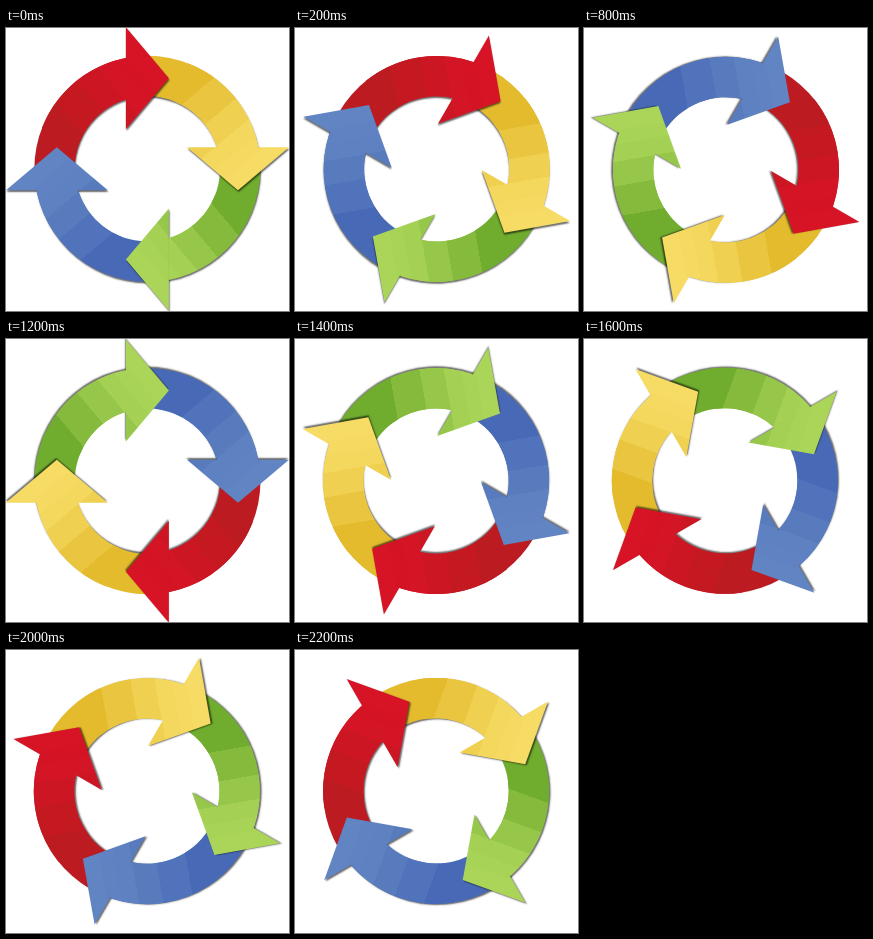
An HTML page with a canvas for the animation above (2.4 s loop, 283 by 283 pixels).

```html
<!DOCTYPE html>
<html lang="en">
<head>
<meta charset="utf-8">
<title>Cycle of four arrows</title>
<style>
  html, body { margin: 0; width: 100%; height: 100%; overflow: hidden; background: #fff; }
  canvas { display: block; width: 283px; height: 283px; }
</style>
</head>
<body>
<canvas id="stage"></canvas>
<script>
const SIZE = 283, STEP_MS = 200, STEPS = 12;
const OUTER = 113, INNER = 72.7;
const HEAD = { y: -90.6, tip: 21.5, half: 51 };
const SHADOW = { x: 0.7, y: 1.7, blur: 1.6, color: 'rgba(0,0,0,.58)' };

// Colour bands along the gradient axis: where each ends and how light it is.
const FROM = -90, TO = 80, TILT = -40 * Math.PI / 180;
const BANDS = [[-27, 0], [3, 0.35], [27, 0.65], [44, 0.88], [58, 0.94], [TO, 1]];

// Tail and tip colours, clockwise from the upper left.
const COLORS = [
  [[188, 27, 33], [214, 20, 37]],
  [[227, 187, 45], [246, 219, 100]],
  [[112, 172, 46], [171, 213, 89]],
  [[72, 106, 182], [97, 132, 195]]
];

const canvas = document.getElementById('stage');
const ctx = canvas.getContext('2d');
const ratio = window.devicePixelRatio || 1;
canvas.width = canvas.height = SIZE * ratio;

function bandedFill([tail, tip]) {
  const c = Math.cos(TILT), s = Math.sin(TILT);
  const g = ctx.createLinearGradient(FROM * c, FROM * s, TO * c, TO * s);
  let from = FROM;
  for (const [to, k] of BANDS) {
    const color = `rgb(${tail.map((v, j) => Math.round(v + (tip[j] - v) * k))})`;
    g.addColorStop((from - FROM) / (TO - FROM), color);
    g.addColorStop((to - FROM) / (TO - FROM), color);
    from = to;
  }
  return g;
}

const fills = COLORS.map(bandedFill);

function arc(from, to) {
  const a = from * Math.PI / 180, b = to * Math.PI / 180;
  ctx.beginPath();
  ctx.arc(0, 0, OUTER, a, b);
  ctx.arc(0, 0, INNER, b, a, true);
  ctx.closePath();
  ctx.fill();
}

function head() {
  ctx.beginPath();
  ctx.moveTo(-HEAD.tip, HEAD.y - HEAD.half);
  ctx.lineTo(HEAD.tip, HEAD.y);
  ctx.lineTo(-HEAD.tip, HEAD.y + HEAD.half);
  ctx.closePath();
  ctx.fill();
}

// Body beside the head, kept free of the head's own shadow.
function cleanBody() {
  ctx.beginPath();
  ctx.rect(-150, -150, 150 - HEAD.tip + 0.5, 150);
  ctx.clip();
  arc(201, 270);
}

function eachArrow(paint) {
  fills.forEach((fill, i) => {
    ctx.save();
    ctx.rotate(i * Math.PI / 2);
    ctx.fillStyle = fill;
    paint();
    ctx.restore();
  });
}

// Canvas shadows ignore the transform, so the offset is turned here.
function setShadow(on, turn) {
  const c = Math.cos(turn), s = Math.sin(turn);
  ctx.shadowColor = on ? SHADOW.color : 'transparent';
  ctx.shadowBlur = SHADOW.blur * ratio;
  ctx.shadowOffsetX = (SHADOW.x * c - SHADOW.y * s) * ratio;
  ctx.shadowOffsetY = (SHADOW.x * s + SHADOW.y * c) * ratio;
}

function draw(step) {
  const turn = step * 2 * Math.PI / STEPS;
  ctx.setTransform(ratio, 0, 0, ratio, 0, 0);
  setShadow(false, turn);
  ctx.fillStyle = '#fff';
  ctx.fillRect(0, 0, SIZE, SIZE);
  ctx.translate(141.4, 141.5);
  ctx.rotate(turn);
  ctx.translate(0, -0.7);

  setShadow(true, turn);
  eachArrow(() => arc(180, 270));
  eachArrow(head);
  setShadow(false, turn);
  eachArrow(cleanBody);
}

const start = performance.now();
function tick() {
  const t = Math.max(0, performance.now() - start);
  draw(Math.floor(t / STEP_MS) % STEPS);
  requestAnimationFrame(tick);
}
draw(0);
requestAnimationFrame(tick);
</script>
</body>
</html>
```
